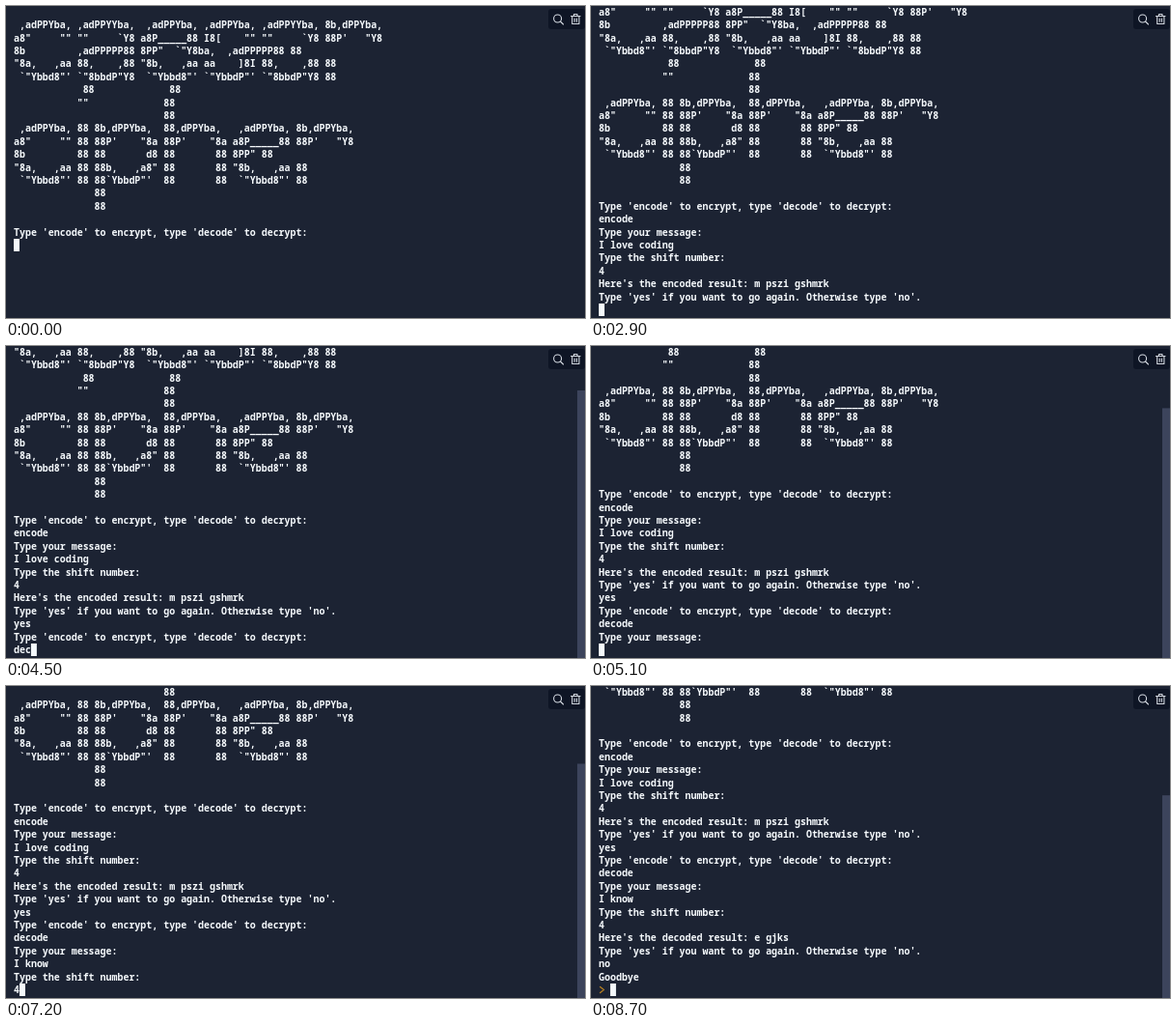
Recreate the animation shown at these times as an HTML page with a canvas. Size 600x323 px, loop 8.8 s.

```html
<!DOCTYPE html>
<html lang="en">
<head>
<meta charset="utf-8">
<title>Cipher terminal</title>
<style>
  html, body { margin: 0; width: 100%; height: 100%; overflow: hidden; background: #1c2333; }
  canvas { display: block; }
</style>
</head>
<body>
<canvas id="stage" width="600" height="323"></canvas>
<pre id="banner" hidden>
 ,adPPYba, ,adPPYYba,  ,adPPYba, ,adPPYba, ,adPPYYba, 8b,dPPYba,
a8"     "" ""     `Y8 a8P_____88 I8[    "" ""     `Y8 88P'   "Y8
8b         ,adPPPPP88 8PP"  `"Y8ba,  ,adPPPPP88 88
"8a,   ,aa 88,    ,88 "8b,   ,aa aa    ]8I 88,    ,88 88
 `"Ybbd8"' `"8bbdP"Y8  `"Ybbd8"' `"YbbdP"' `"8bbdP"Y8 88
            88             88
           ""             88
                          88
 ,adPPYba, 88 8b,dPPYba,  88,dPPYba,   ,adPPYba, 8b,dPPYba,
a8"     "" 88 88P'    "8a 88P'    "8a a8P_____88 88P'   "Y8
8b         88 88       d8 88       88 8PP" 88
"8a,   ,aa 88 88b,   ,a8" 88       88 "8b,   ,aa 88
 `"Ybbd8"' 88 88`YbbdP"'  88       88  `"Ybbd8"' 88
              88
              88
</pre>
<script>
const W = 600, H = 323, LOOP = 8800;
const LEFT = 8, TOP = 13.2, CELL = 5.97, ROW = 13.4, BASE = 10;
const MAX_ROW = 22, BAR_FROM = 3000;
const TEXT = '#f5f9fc', BG = '#1c2333';

const ctx = document.getElementById('stage').getContext('2d');
const banner = document.getElementById('banner').textContent.trimEnd();

const ASK_MODE = "Type 'encode' to encrypt, type 'decode' to decrypt:\n";
const ASK_TEXT = 'Type your message:\n';
const ASK_SHIFT = 'Type the shift number:\n';
const ASK_AGAIN = "Type 'yes' if you want to go again. Otherwise type 'no'.\n";
const PROMPT = '\u203a';

const events = [];
const print = (time, text) => events.push({ time, text });
const type = (time, text) => [...text].forEach((c, i) => print(time + i * 100, c));

print(0, banner + '\n\n' + ASK_MODE);
type(100, 'encode');
print(800, '\n' + ASK_TEXT);
type(900, 'I love coding');
print(2200, '\n' + ASK_SHIFT);
type(2300, '4');
print(2500, "\nHere's the encoded result: m pszi gshmrk\n" + ASK_AGAIN);
type(3700, 'yes');
print(4100, '\n' + ASK_MODE);
type(4300, 'decode');
print(5000, '\n' + ASK_TEXT);
type(6400, 'I know');
print(7000, '\n' + ASK_SHIFT);
type(7200, '4');
print(7400, "\nHere's the decoded result: e gjks\n" + ASK_AGAIN);
type(8000, 'no');
print(8300, '\nGoodbye\n');
print(8400, PROMPT + ' ');

// Text is set at 20px and scaled down, so columns keep a fractional pitch.
function drawText(text, x, y) {
  ctx.save();
  ctx.translate(x, y);
  ctx.scale(CELL / 12, CELL / 12);
  ctx.font = '600 20px "Noto Sans Mono", "Liberation Mono", monospace';
  ctx.fillStyle = TEXT;
  ctx.fillText(text, 0, 0);
  ctx.restore();
}

function stroke(color, width, path) {
  ctx.strokeStyle = color;
  ctx.lineWidth = width;
  ctx.stroke(new Path2D(path));
}

function drawTools() {
  ctx.fillStyle = '#0e1525';
  ctx.beginPath();
  ctx.roundRect(562, 3, 38, 21, 3);
  ctx.fill();
  ctx.lineCap = ctx.lineJoin = 'round';
  stroke('#d3d8e0', 1.1, 'M575.6 13a4 4 0 1 1-8 0a4 4 0 1 1 8 0M574.5 16l3 3');
  stroke('#d3d8e0', 1.1, 'M585.5 10.5h9.5M588.5 10.5v-2h3.5v2' +
    'M586.7 10.5v8h7.2v-8M589.2 13v3.2M591.4 13v3.2');
}

function draw(now) {
  const lines = events.filter(e => e.time <= now).map(e => e.text).join('').split('\n');
  const last = lines.length - 1;
  const scroll = Math.max(0, last - MAX_ROW) * ROW;
  const cellTop = row => TOP + row * ROW - scroll;

  ctx.fillStyle = BG;
  ctx.fillRect(0, 0, W, H);

  lines.forEach((line, row) => {
    const y = cellTop(row);
    if (y < -ROW / 2) return;
    if (line.startsWith(PROMPT)) {
      stroke('#b27d22', 1.4, `M9.5 ${y + 3.5}l3.8 3l-3.8 3`);
    } else {
      drawText(line, LEFT, y + BASE);
    }
  });

  ctx.fillStyle = TEXT;
  ctx.fillRect(LEFT + lines[last].length * CELL, cellTop(last), CELL, 13);

  if (scroll && now >= BAR_FROM) {
    const y = H * scroll / (H + scroll);
    ctx.fillStyle = '#3c445c';
    ctx.fillRect(592, y, 8, H - y);
  }
  drawTools();
}

const start = performance.now();
function tick() {
  draw((performance.now() - start) % LOOP);
  requestAnimationFrame(tick);
}
tick();
</script>
</body>
</html>
```
